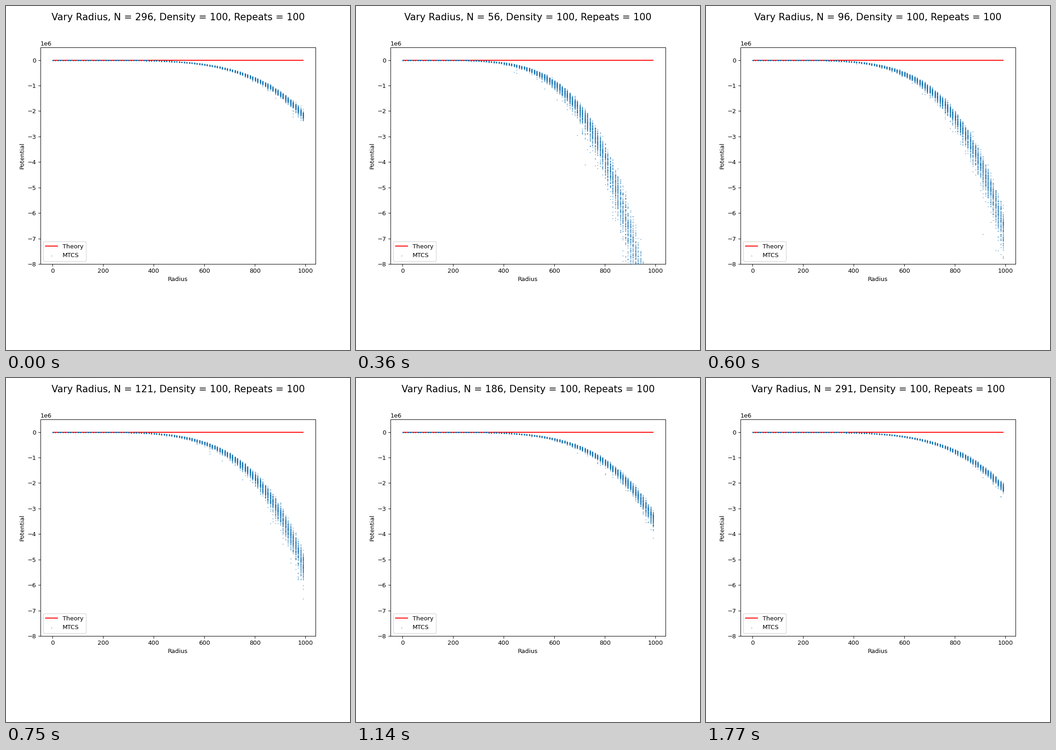
Write a matplotlib script that moves like this. It is 748 px wide and 748 px high and loops after 1.8 s.

```python
import numpy as np
import matplotlib.pyplot as plt
from matplotlib.animation import FuncAnimation

G = 6.674e-11
DENSITY = 100
REPEATS = 100
STEPS = 60
POOL = 4_000_000

radii = np.arange(1, 1000, 10)
mass = DENSITY * radii.astype(float) ** 3
xs = np.repeat(radii, REPEATS)

# Distances, in radii, from a surface point to uniform points in the ball
inverse = 1 / (2 * np.random.default_rng(7).beta(3, 2, POOL))


def simulate(n):
    """Energy of a surface body with n random bodies, for each radius."""
    size = len(xs) * n
    start = np.random.default_rng(n).integers(0, POOL - size)
    draws = inverse[start:start + size].reshape(len(radii), REPEATS, n)
    scale = G * mass ** 2 / (radii * n)
    return -(scale[:, None] * draws.mean(axis=2)).ravel()


plt.rcParams["font.family"] = "DejaVu Sans"
fig, ax = plt.subplots(figsize=(8, 8), dpi=93.5)
fig.subplots_adjust(left=0.1, right=0.9, bottom=0.25, top=0.8798)
title = fig.suptitle("", fontsize=16)

ax.plot(radii, -G * mass / radii, color="red", label="Theory")
dots = ax.scatter(xs, np.zeros(len(xs)), s=0.2, alpha=0.8, color="tab:blue",
                  zorder=3, label="MTCS")
ax.set_xlim(-48.5, 1040.5)
ax.set_ylim(-8e6, 0.5e6)
ax.set_xlabel("Radius")
ax.set_ylabel("Potential")
ax.legend(loc="lower left")


def update(i):
    n = 1 + 5 * ((i - 1) % STEPS)
    dots.set_offsets(np.column_stack([xs, simulate(n)]))
    title.set_text(f"Vary Radius, N = {n}, Density = {DENSITY}, "
                   f"Repeats = {REPEATS}")
    return dots, title


anim = FuncAnimation(fig, update, frames=STEPS, interval=30, repeat=True,
                     repeat_delay=0)
plt.show()
```
